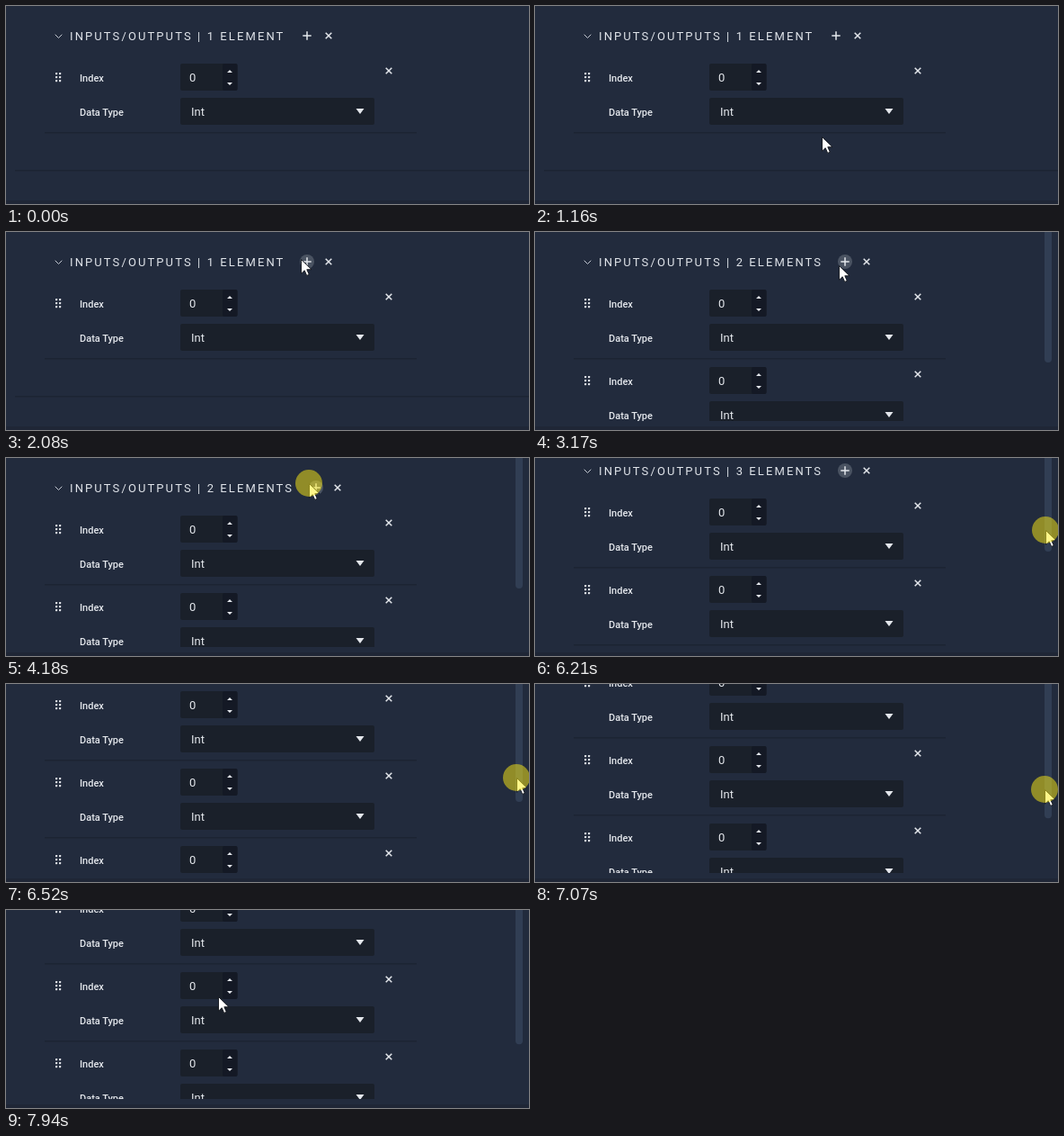
These frames come from a looping animation (582x220 px, 8 s). An HTML page:

```html
<!DOCTYPE html>
<html lang="en">
<head>
<meta charset="utf-8">
<title>Inputs and outputs list</title>
<style>
  html, body { margin: 0; width: 100%; height: 100%; overflow: hidden; background: #222b3d; }
  svg { display: block; font-family: Roboto, Arial, sans-serif; fill: #e4e7ec; }
  .title { font-size: 13px; letter-spacing: 2.1px; fill: #e0e4ea; white-space: pre; }
  .label { font-size: 11px; font-weight: 500; }
  .value { font-size: 13px; }
  .field { fill: #1a202a; }
  .spin { fill: #141925; }
  .rule { fill: #1c2433; }
  .icon { fill: none; stroke: #e4e7ec; stroke-width: 1.5; }
  .thin { stroke-width: 1; stroke: #c9ced7; }
</style>
</head>
<body>
<svg width="582" height="220" viewBox="0 0 582 220">
  <defs>
    <clipPath id="view"><rect width="582" height="210"/></clipPath>
    <g id="item">
      <g id="dots"></g>
      <text class="label" x="82" y="83.5">Index</text>
      <rect class="field" x="194" y="64" width="63.5" height="30" rx="2"/>
      <rect class="spin" x="241" y="64" width="16.5" height="30" rx="2"/>
      <text class="value" x="204" y="84">0</text>
      <path d="M246 74h6l-3-3zM246 85h6l-3 3z"/>
      <path class="icon" d="M422.7 68.7l6.6 6.6m0-6.6l-6.6 6.6"/>
      <text class="label" x="82" y="121.5">Data Type</text>
      <rect class="field" x="194" y="102" width="216" height="30" rx="2"/>
      <text class="value" x="206" y="122">Int</text>
      <path d="M389.5 114h9l-4.5 6z"/>
      <rect class="rule" x="43" y="140" width="414" height="1.5"/>
    </g>
  </defs>
  <rect width="582" height="220" fill="#222b3d"/>
  <rect y="216" width="582" height="4" fill="#1f2636"/>
  <g clip-path="url(#view)">
    <g id="content">
      <path class="icon thin" d="M54.7 31.7l3.8 3.8 3.8-3.8"/>
      <text class="title" id="title" x="71" y="38"></text>
      <g id="buttons">
        <circle id="hover" cx="335" cy="33" r="8" fill="#4a5362"/>
        <path class="icon" d="M330.3 33h9.4M335 28.3v9.4M355.7 29.7l6.6 6.6m0-6.6l-6.6 6.6"/>
      </g>
      <use href="#item"/>
      <use href="#item" y="86" class="extra"/>
      <use href="#item" y="172" class="extra"/>
      <rect id="end" class="rule" x="10" y="182" width="572" height="1.5"/>
    </g>
    <rect id="thumb" x="567" y="-10" width="8" rx="4" fill="#313e54"/>
  </g>
  <g id="cursor">
    <path d="M.5 .5V16.2L4.2 12.7L6.7 18.4L9.3 17.3L6.8 11.7H12z" fill="#fff" stroke="#10131a" stroke-width=".9"/>
    <circle id="press" r="15" fill="#ffee14" fill-opacity=".5"/>
  </g>
</svg>
<script>
const LOOP = 8000, STEP = 77, ROW = 86;
const MAX_SCROLL = 81, THUMB_RATIO = 1.366;
const $ = id => document.getElementById(id);

// Each move runs from the last point to a new one, curving towards its bend
const moves = [];
let last = [410, 222];
function moveTo(start, steps, to, bend) {
  const from = last;
  bend ??= from.map((v, i) => (v + to[i]) / 2);
  moves.push({ start, steps, from, bend, to });
  last = to;
}
moveTo(780, 11, [312, 66], [285, 160]);
moveTo(1620, 9, [334, 31], [321, 24]);
moveTo(3170, 5, [342, 69], [344, 45]);
moveTo(3640, 6, [337, 28]);
moveTo(4410, 11, [592, 100], [582, 111]);
moveTo(5260, 7, [568, 63], [574, 56]);
moveTo(6140, 10, [568, 115], [568, 110]);
moveTo(7070, 4, [564, 122]);
moveTo(7540, 6, [236, 96]);

const presses = [[2460, 2690], [4180, 4410], [5970, 7230]];
const hovers = [[2001, 3320], [3780, LOOP]];

for (let i = 0; i < 6; i++) {
  const dot = document.createElementNS("http://www.w3.org/2000/svg", "rect");
  const place = { x: 55 + i % 2 * 4, y: 74 + (i >> 1) * 4, width: 2.2, height: 2.2, rx: .6 };
  for (const key in place) dot.setAttribute(key, place[key]);
  $("dots").append(dot);
}

// Pointer place, and the time of the step it rests on
function pointer(t) {
  const m = moves.findLast(m => t >= m.start);
  if (!m) return { held: 0, spot: moves[0].from };
  const step = Math.min(m.steps - 1, Math.floor((t - m.start) / STEP + .25));
  const p = (step + 1) / m.steps, q = 1 - p;
  const spot = m.from.map((v, i) =>
    Math.round(q * q * v + 2 * p * q * m.bend[i] + p * p * m.to[i]));
  return { held: m.start + step * STEP, spot };
}

function scrollAt(t) {
  const p = Math.min(1, Math.max(0, (t - 6078) / 928));
  return Math.round(MAX_SCROLL * Math.sin(p * Math.PI / 2));
}

const within = (spans, t) => spans.some(([a, b]) => t >= a && t < b);
const show = (el, on) => { el.style.display = on ? "" : "none"; };
const shift = (el, x, y) => el.setAttribute("transform", `translate(${x} ${y})`);
const extras = document.querySelectorAll(".extra");

function draw(t) {
  const { held, spot } = pointer(t);
  const count = t < 2690 ? 1 : t < 4410 ? 2 : 3;
  const offset = scrollAt(held);

  $("title").textContent = `INPUTS/OUTPUTS | ${count} ELEMENT${count > 1 ? "S" : ""}`;
  shift($("buttons"), count > 1 ? 10 : 0, 0);
  show($("hover"), within(hovers, t));
  extras.forEach((el, i) => show(el, i + 1 < count));
  shift($("end"), 0, (count - 1) * ROW);
  shift($("content"), 0, -offset);

  show($("thumb"), count > 1);
  $("thumb").setAttribute("height", 10 + (count === 2 ? 145 : 90 + offset / THUMB_RATIO));

  shift($("cursor"), ...spot);
  show($("press"), within(presses, t));
}

const start = performance.now();
function tick(now) {
  draw(Math.max(0, now - start) % LOOP);
  requestAnimationFrame(tick);
}
draw(0);
requestAnimationFrame(tick);
</script>
</body>
</html>
```
